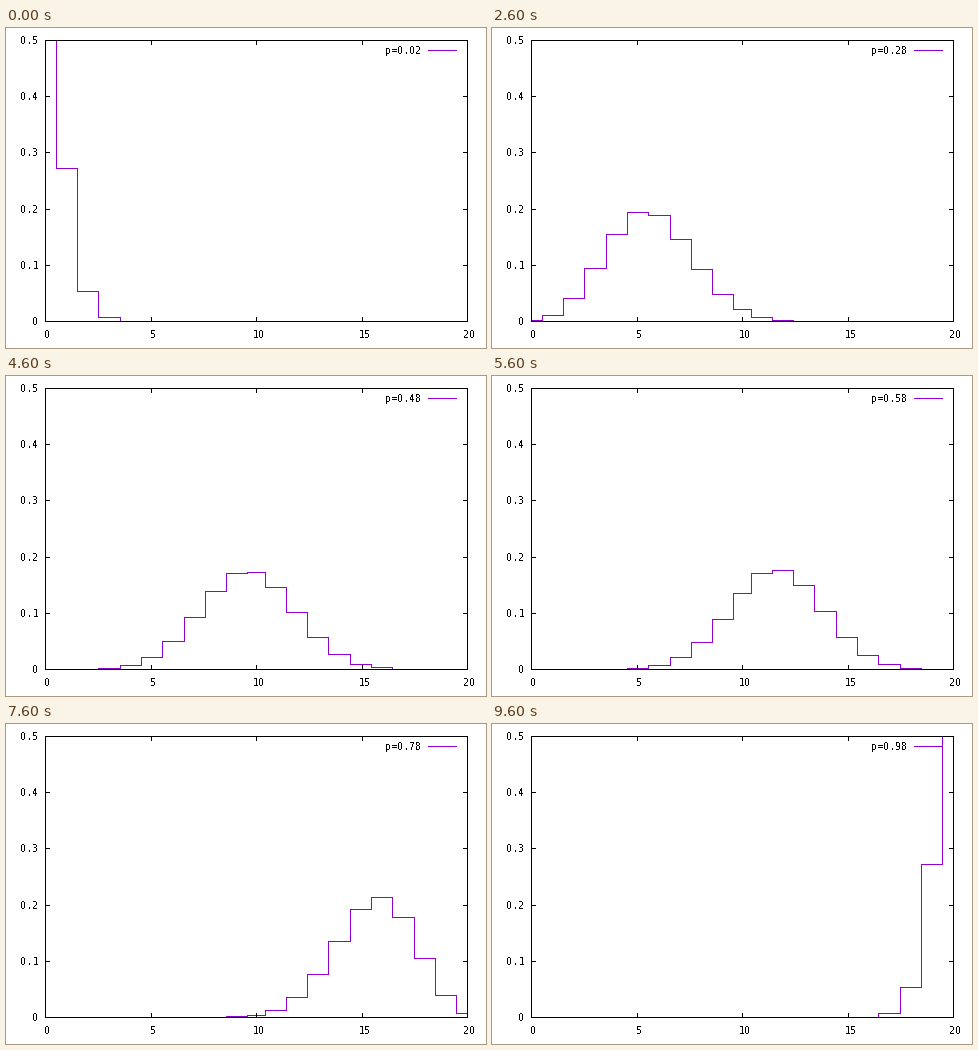
Recreate the animation shown at these times as a matplotlib script. Size 480 px wide and 320 px high, loop 9.8 s.

```python
import math

import numpy as np
import matplotlib.pyplot as plt
from matplotlib.animation import FuncAnimation

W, H, DPI = 480, 320, 80
PX = 72 / DPI  # points per pixel
LEFT, RIGHT, TOP, BOTTOM = 39, 461, 12, 293
TRIALS, SAMPLES, FRAMES = 20, 100, 49
TICK, CELL = 4, 6
PURPLE = "#9400d3"

fig = plt.figure(figsize=(W / DPI, H / DPI), dpi=DPI, facecolor="white")
ax = fig.add_axes([0, 0, 1, 1])
ax.set_xlim(0, W)
ax.set_ylim(H, 0)
ax.axis("off")
plt.rcParams["text.antialiased"] = False


def col(x):
    return np.floor(LEFT + np.asarray(x) * (RIGHT - LEFT) / TRIALS + 0.5)


def row(y):
    return BOTTOM - np.floor(np.asarray(y) * (BOTTOM - TOP) / 0.5 + 0.5)


def stroke(xs, ys, color="black", z=3):
    """One-pixel line; snapping moves it onto the given columns and rows."""
    return ax.plot(xs, ys, color=color, lw=PX, snap=True,
                   antialiased=False, solid_capstyle="projecting",
                   solid_joinstyle="miter", zorder=z)[0]


def glyph_font(ch):
    """The monospaced zero is dotted, so take the plain one."""
    return "DejaVu Sans" if ch == "0" else "DejaVu Sans Mono"


def label(text, x, line_row):
    """Fixed-pitch text, one glyph per cell, centred on a pixel row."""
    return [ax.text(x + i * CELL + 2.5, line_row + 4, ch, ha="center",
                    va="baseline", fontsize=9.6 * PX, color="black",
                    family=glyph_font(ch), zorder=4)
            for i, ch in enumerate(text)]


def binomial(k, p):
    return math.comb(TRIALS, k) * p ** k * (1 - p) ** (TRIALS - k)


# The curve is sampled evenly; each step falls midway between two samples.
grid = np.linspace(0, TRIALS, SAMPLES)
bins = np.floor(grid + 0.5).astype(int)
jumps = np.flatnonzero(np.diff(bins))
edges = np.concatenate(([0], (grid[jumps] + grid[jumps + 1]) / 2, [TRIALS]))
step_x = np.repeat(col(edges), 2)[1:-1]

# Border, mirrored ticks and their labels
stroke([LEFT, RIGHT, RIGHT, LEFT, LEFT], [TOP, TOP, BOTTOM, BOTTOM, TOP])
for value in range(0, TRIALS + 1, 5):
    x = col(value)
    stroke([x, x], [BOTTOM - TICK, BOTTOM])
    stroke([x, x], [TOP, TOP + TICK])
    name = str(value)
    label(name, x - CELL // 2 * (len(name) - 1), 306)
for tenth in range(6):
    y = row(tenth / 10)
    stroke([LEFT, LEFT + TICK], [y, y])
    stroke([RIGHT - TICK, RIGHT], [y, y])
    name = f"{tenth / 10:g}"
    label(name, 33 - CELL * len(name), y)

key = label("p=0.02", 380, 22)
stroke([422, 450], [22, 22], PURPLE, 2)
curve = stroke(step_x, np.full(len(step_x), BOTTOM), PURPLE, 2)


def update(i):
    p = (i + 1) / 50
    heights = np.array([binomial(k, p) for k in range(TRIALS + 1)])
    curve.set_ydata(np.repeat(row(np.minimum(heights, 0.5)), 2))
    for glyph, ch in zip(key, f"p={p:.2f}"):
        glyph.set_text(ch)
        glyph.set_family(glyph_font(ch))
    return [curve, *key]


anim = FuncAnimation(fig, update, frames=FRAMES, interval=200,
                     repeat=True, repeat_delay=0, blit=False)
plt.show()
```
